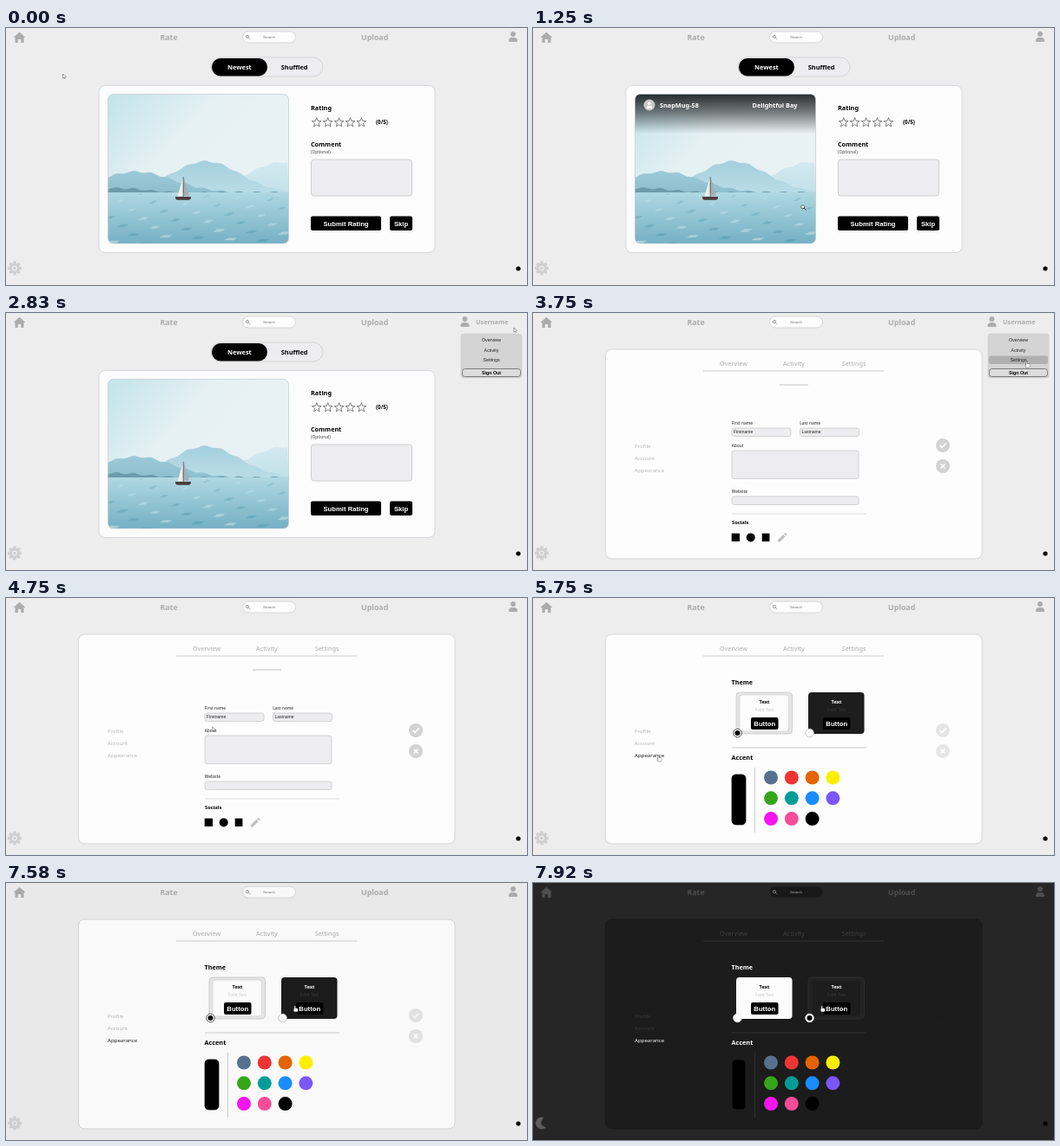
These frames come from a looping animation (600x297 px, 8 s). An HTML page with a canvas:

```html
<!DOCTYPE html>
<html lang="en">
<head>
<meta charset="utf-8">
<title>Photo rating</title>
<style>
html, body { margin: 0; width: 100%; height: 100%; overflow: hidden; background: #edecee; }
canvas { display: block; width: 600px; height: 297px; }
</style>
</head>
<body>
<canvas id="stage"></canvas>
<script>
const LOOP = 8000;
const SANS = '"Noto Sans", "Open Sans", sans-serif';
const ARIAL = '"Liberation Sans", Arial, sans-serif';
const FIELD = '#edecee';
const canvas = document.getElementById('stage');
const c = canvas.getContext('2d');
const ratio = window.devicePixelRatio || 1;
canvas.width = 600 * ratio;
canvas.height = 297 * ratio;

const clamp = v => Math.max(0, Math.min(1, v));
const ease = v => v * v * (3 - 2 * v);
const ramp = (t, a, b) => ease(clamp((t - a) / (b - a)));
const lerp = (a, b, k) => a + (b - a) * k;
const inside = (p, x, y, x2, y2) => p.x > x && p.x < x2 && p.y > y && p.y < y2;

let dark = 0;

// Blend of two grey levels by the current theme
function tone(light, night) {
  const v = Math.round(lerp(light, night, dark));
  return `rgb(${v},${v},${v})`;
}

function paint(fill, line, width) {
  if (fill) { c.fillStyle = fill; c.fill(); }
  if (line) { c.strokeStyle = line; c.lineWidth = width; c.stroke(); }
}

function box(x, y, x2, y2, r, fill, line, width = 1) {
  c.beginPath();
  c.roundRect(x, y, x2 - x, y2 - y, r);
  paint(fill, line, width);
}

function disc(x, y, r, fill, line, width = 1) {
  c.beginPath();
  c.arc(x, y, r, 0, Math.PI * 2);
  paint(fill, line, width);
}

function poly(points, fill, line, width = 1) {
  c.beginPath();
  points.forEach(([x, y]) => c.lineTo(x, y));
  c.closePath();
  paint(fill, line, width);
}

function rule(x, y, x2, y2, color, width = 1) {
  c.beginPath();
  c.moveTo(x, y);
  c.lineTo(x2, y2);
  paint(null, color, width);
}

// y is the middle of the capitals
function text(s, x, y, size, color, { bold = false, face = SANS, align = 'left' } = {}) {
  c.font = `${bold ? 700 : 400} ${size}px ${face}`;
  c.textAlign = align;
  c.fillStyle = color;
  c.fillText(s, x, y + size * 0.36 - 0.3);
}

const bold = (s, x, y, size, color) => text(s, x, y, size, color, { bold: true });
const middle = (s, x, y, size, color) => text(s, x, y, size, color, { align: 'center' });

function faded(alpha, draw) {
  if (alpha <= 0) return;
  c.save();
  c.globalAlpha *= alpha;
  draw();
  c.restore();
}

function at(x, y, scale, draw) {
  c.save();
  c.translate(x, y);
  c.scale(scale, scale);
  draw();
  c.restore();
}

function shade(y, y2, a, b) {
  const g = c.createLinearGradient(0, y, 0, y2);
  g.addColorStop(0, a);
  g.addColorStop(1, b);
  return g;
}

function person(x, y, color, scale = 1) {
  at(x, y, scale, () => {
    disc(0, -3, 2.9, color);
    box(-5, 1, 5, 6, [4, 4, 1, 1], color);
  });
}

function house(x, y, color) {
  poly([[x - 7, y], [x, y - 6.3], [x + 7, y]], color);
  box(x - 5, y - 1, x - 1.7, y + 6, 0.5, color);
  box(x + 1.7, y - 1, x + 5, y + 6, 0.5, color);
  box(x - 3, y - 1, x + 3, y + 2, 0, color);
}

function lens(x, y, r, color, width) {
  disc(x, y, r, null, color, width);
  rule(x + r * 0.7, y + r * 0.7, x + r * 2, y + r * 2, color, width);
}

function gear(x, y, color) {
  at(x, y, 1, () => {
    for (let i = 0; i < 8; i++) {
      c.rotate(Math.PI / 4);
      box(-1.7, -8, 1.7, -3, 0, color);
    }
    disc(0, 0, 4.7, null, color, 2.6);
    disc(0, 0, 1.8, color);
  });
}

function moon(x, y, color) {
  c.beginPath();
  c.arc(x, y, 7, -1.2, 0.75, true);
  c.quadraticCurveTo(x - 5, y + 2, x + 2.5, y - 6.5);
  paint(color);
}

function nav(open) {
  const grey = tone(172, 78);
  house(15.5, 11, grey);
  bold('Rate', 177.5, 11, 8.8, grey);
  bold('Upload', 409, 11, 8.8, grey);
  box(272.5, 4, 333.5, 17, 6.5, tone(253, 24), tone(207, 36), 0.8);
  lens(278, 10, 1.7, tone(135, 140), 0.7);
  text('Search', 303, 10.5, 4.4, tone(110, 175), { face: ARIAL, align: 'center' });
  person(lerp(584, 528.5, open), 10, grey);
  faded(clamp(open * 2 - 1), () => bold('Username', 541, 11, 7.3, grey));
  faded(1 - dark, () => gear(10, 277.5, '#d0cfd0'));
  faded(dark, () => moon(10, 277.5, '#5c5c5c'));
  disc(590, 278, 2.6, '#000');
}

function hill(peak, height, spread, top, foot) {
  c.beginPath();
  c.moveTo(117, 190);
  for (let x = 117; x <= 326; x += 3) {
    const bell = Math.exp(-(((x - peak) / spread) ** 2));
    c.lineTo(x, 190 - height * bell - Math.sin(x * 0.31));
  }
  c.lineTo(326, 190);
  paint(shade(190 - height, 190, top, foot));
}

function photo() {
  c.save();
  c.beginPath();
  c.roundRect(117.5, 76.5, 208, 172.5, 6);
  c.clip();
  const sky = c.createLinearGradient(117, 77, 215, 165);
  sky.addColorStop(0, '#c3e3eb');
  sky.addColorStop(0.7, '#e4f0f3');
  sky.addColorStop(1, '#e8f1f4');
  box(117, 76, 326, 191, 0, sky);
  hill(320, 35, 60, '#d3e9f0', '#c3e1ea');
  hill(230, 36, 55, '#a5cfdd', '#b9dde7');
  hill(150, 24, 60, '#9cc9d7', '#8dbfcf');
  hill(130, 5, 40, '#6c9bab', '#6c9bab');
  box(117, 190, 326, 250, 0, shade(190, 249, '#afd8e2', '#75b0c4'));
  for (let i = 0; i < 150; i++) {
    const near = (i * 0.382) % 1;
    const x = 115 + (i * 61.8) % 210;
    const y = 191 + near * 58;
    faded(0.35, () =>
      rule(x, y, x + 3 + near * 8, y, i % 2 ? '#4c94ad' : '#d9eff3', 0.5 + near * 0.6));
  }
  poly([[203.5, 174], [203.5, 194.5], [197.5, 194.5]], '#f0eeea');
  poly([[205, 173], [211, 194], [205, 194]], '#a9aeb0');
  rule(204.3, 172, 204.3, 196, '#4b4544', 0.7);
  box(195, 195, 213, 198.7, [0, 0, 3, 3], '#4a3c3a');
  c.restore();
}

function photoLabel() {
  const g = shade(76, 122, 'rgba(0,0,0,.82)', 'rgba(0,0,0,0)');
  g.addColorStop(0.45, 'rgba(0,0,0,.5)');
  box(117.5, 76.5, 325.5, 122, [6, 6, 0, 0], g);
  disc(134, 89, 6.5, '#c9c9c9');
  person(134, 89, '#fff', 0.65);
  bold('SnapMug-58', 146, 90, 7.3, '#fff');
  bold('Delightful Bay', 252.5, 90, 7.3, '#fff');
}

function star(x, y) {
  const points = Array.from({ length: 10 }, (_, i) => {
    const a = i * Math.PI / 5 - Math.PI / 2;
    const r = i % 2 ? 2.4 : 5.6;
    return [x + r * Math.cos(a), y + r * Math.sin(a)];
  });
  poly(points, null, '#5a5a5a', 0.75);
}

function button(s, x, y, x2, y2) {
  box(x, y, x2, y2, 2, '#000');
  text(s, (x + x2) / 2, (y + y2) / 2 + 0.3, 7.7, '#fff', { bold: true, face: ARIAL, align: 'center' });
}

function ratePage(label) {
  box(236, 34, 365, 56, 11, FIELD, '#d5d4d6');
  box(237, 35, 301, 55.5, 10, '#000');
  bold('Newest', 255, 46, 7.4, '#fff');
  bold('Shuffled', 316.7, 46, 7.4, '#000');
  box(107, 66.5, 494, 259.5, 7, '#fdfcfd', '#d3d7dc');
  photo();
  faded(label, photoLabel);
  box(117.5, 76.5, 325.5, 249, 6, null, '#b9c4c9', 0.6);
  bold('Rating', 351, 92.5, 7.3, '#000');
  for (let i = 0; i < 5; i++) star(357.8 + i * 12.9, 109.3);
  bold('(0/5)', 426, 109, 6.2, '#000');
  bold('Comment', 351, 135, 7.2, '#000');
  text('(Optional)', 351, 143.5, 4.9, '#444');
  box(351.5, 152, 467.5, 194, 3, FIELD, '#cfcfcf');
  button('Submit Rating', 351, 217.6, 432, 234);
  button('Skip', 442, 217.6, 468, 234);
}

function field(label, x, y, width, height, value) {
  text(label, x - 0.3, y - 5, 4.9, '#222');
  box(x, y, x + width, y + height, 2.5, FIELD, '#c9c9c9', 0.8);
  if (value) text(value, x + 2, y + height / 2, 5, '#222', { face: ARIAL });
}

function profile() {
  rule(284, 83, 317, 83, '#c4c4c4');
  field('First name', 229, 133, 68, 9.5, 'Firstname');
  field('Last name', 307.5, 133, 68, 9.5, 'Lastname');
  field('About', 229, 159, 146, 32.5);
  field('Website', 229, 212, 146, 9.5);
  rule(229, 232, 384, 232, '#dcdcdc');
  bold('Socials', 229, 242.5, 5.7, '#000');
  box(228.7, 254.7, 238, 264, 0, '#000');
  disc(250.7, 259.4, 5, '#000');
  box(263.7, 254.7, 272.4, 264, 0, '#000');
  rule(282.5, 264, 289.5, 257, '#c2c2c2', 3.2);
  rule(290.2, 256.3, 291.7, 254.8, '#c2c2c2', 3.2);
}

function themeCard(x, fill, ink, faint, on, ring) {
  box(x, 109, x + 64.5, 157, 4, fill);
  faded(on, () => {
    box(x, 109, x + 64.5, 157, 4, ring, tone(200, 48), 0.8);
    box(x + 4, 112, x + 60.5, 154, 3, fill, tone(208, 42), 0.7);
  });
  text('Text', x + 32.5, 120.5, 5.7, ink, { bold: true, align: 'center' });
  middle('Faint Text', x + 32.5, 129.5, 4.8, faint);
  button('Button', x + 17, 138, x + 48.5, 152);
  disc(x + 1.5, 156, 4.8, '#fff', tone(lerp(190, 70, on), 235), 0.9);
  faded(on, () => disc(x + 1.5, 156, 3, '#000'));
}

const SWATCHES = ['#56718f', '#f03434', '#e56300', '#ffee00', '#36a51c', '#049c98',
  '#1a8cff', '#7a56f7', '#f714ef', '#f64c98', '#000000'];

function appearance() {
  const ink = tone(0, 255);
  const line = tone(205, 48);
  bold('Theme', 228.5, 97.5, 7.2, ink);
  themeCard(234, '#fdfcfd', '#000', '#c9c9c9', 1 - dark, '#e5e4e5');
  themeCard(317, '#1d1d1d', '#fff', '#3d3d3d', dark, '#232323');
  rule(229, 173, 384, 173, line);
  bold('Accent', 228.5, 185, 7.3, ink);
  box(229, 204, 245, 262, 4.5, '#000', tone(0, 36), 0.7);
  rule(255.5, 196, 255.5, 271, line);
  SWATCHES.forEach((color, i) =>
    disc(274 + (i % 4) * 23.8, 207.5 + Math.floor(i / 4) * 23.8, 8, color));
}

function settingsPage(styling, cursor) {
  box(83.5, 42, 517, 284, 7, tone(253, 28), tone(214, 25));
  ['Overview', 'Activity', 'Settings'].forEach((s, i) =>
    middle(s, 231 + i * 69.3, 58.5, 7.3, tone(172, 62)));
  rule(196, 67, 404, 67, tone(205, 52));
  ['Profile', 'Account', 'Appearance'].forEach((s, i) => {
    const y = 154 + i * 14;
    const lit = inside(cursor, 117, y - 7, 153, y + 5) || (styling && i === 2);
    text(s, 117, y + 0.5, 6.1, lit ? tone(30, 250) : tone(182, 58));
  });
  const knob = styling ? tone(229, 28) : '#d2d2d2';
  const mark = tone(255, 28);
  disc(472, 153, 8, knob);
  rule(468.5, 153, 471.5, 156, mark, 1.7);
  rule(470.5, 156, 475.7, 150.5, mark, 1.7);
  disc(472, 177, 8, knob);
  rule(469.5, 174.5, 474.5, 179.5, mark, 1.7);
  rule(474.5, 174.5, 469.5, 179.5, mark, 1.7);
  if (styling) appearance(); else profile();
}

function menu(cursor) {
  box(524, 24, 594, 75, 3, '#d5d4d5', '#cbcbcb', 0.6);
  ['Overview', 'Activity', 'Settings'].forEach((s, i) => {
    const y = 31.7 + i * 11.3;
    if (inside(cursor, 524, y - 4, 594, y + 7)) box(525, y - 4.7, 593, y + 4.7, 2, '#b1b0b1');
    text(s, 559, y, 5.3, '#222', { face: ARIAL, align: 'center' });
  });
  box(525.5, 64.5, 592.5, 73.5, 3, '#dddcdd', '#666', 0.8);
  text('Sign Out', 559, 69, 5.3, '#000', { bold: true, face: ARIAL, align: 'center' });
}

// Pointer moves: begin, end, x, y
const MOVES = [
  [120, 1250, 309, 205],
  [1300, 2300, 583, 11],
  [2400, 2800, 585, 17],
  [2950, 3400, 568, 56],
  [4190, 4420, 243, 147],
  [4670, 5250, 144, 182],
  [5800, 6500, 275, 232],
  [6600, 7330, 332, 142]
];

function cursorAt(t) {
  return MOVES.reduce((p, [begin, end, x, y]) => {
    const k = ramp(t, begin, end);
    return { x: lerp(p.x, x, k), y: lerp(p.y, y, k) };
  }, { x: 65.5, y: 53 });
}

function cursorKind(page, p) {
  if (page === 'rate' && inside(p, 117, 77, 325, 249)) return 'zoom';
  const link = inside(p, 524, 25, 594, 75) || inside(p, 117, 147, 153, 190);
  const option = page === 'theme' &&
    (inside(p, 317, 109, 382, 157) || inside(p, 265, 199, 354, 264));
  return link || option ? 'hand' : 'arrow';
}

function pointer(kind, p) {
  at(p.x, p.y, 0.9, () => {
    if (kind === 'zoom') {
      lens(2, 2, 2.1, '#333', 1.1);
      disc(2, 2, 1.6, '#fff');
    } else if (kind === 'hand') {
      box(-0.8, 3, 4.6, 7.6, 1.5, '#fff', '#555', 0.6);
      box(0, 0, 1.6, 5, 0.8, '#fff', '#555', 0.6);
      box(0.2, 3.3, 4.2, 7, 1, '#fff');
    } else {
      poly([[0, 0], [0, 5.8], [1.6, 4.6], [4, 4.1]], '#fff', '#666', 0.7);
      rule(1.8, 4.6, 2.7, 6.4, '#666', 0.9);
    }
  });
}

function draw(t) {
  const pos = cursorAt(t);
  const page = t < 3580 ? 'rate' : t < 5700 ? 'profile' : 'theme';
  dark = ramp(t, 7550, 7920);
  c.setTransform(ratio, 0, 0, ratio, 0, 0);
  box(0, 0, 600, 297, 0, tone(237, 38));
  nav(ramp(t, 2480, 2740) * (1 - ramp(t, 4250, 4420)));
  if (page === 'rate') ratePage(ramp(t, 460, 760) * (1 - ramp(t, 1440, 1740)));
  else settingsPage(page === 'theme', pos);
  faded(ramp(t, 2560, 2780) * (1 - ramp(t, 4240, 4400)), () => menu(pos));
  pointer(cursorKind(page, pos), pos);
}

const start = performance.now();
function tick() {
  draw((performance.now() - start) % LOOP);
  requestAnimationFrame(tick);
}
tick();
</script>
</body>
</html>
```
